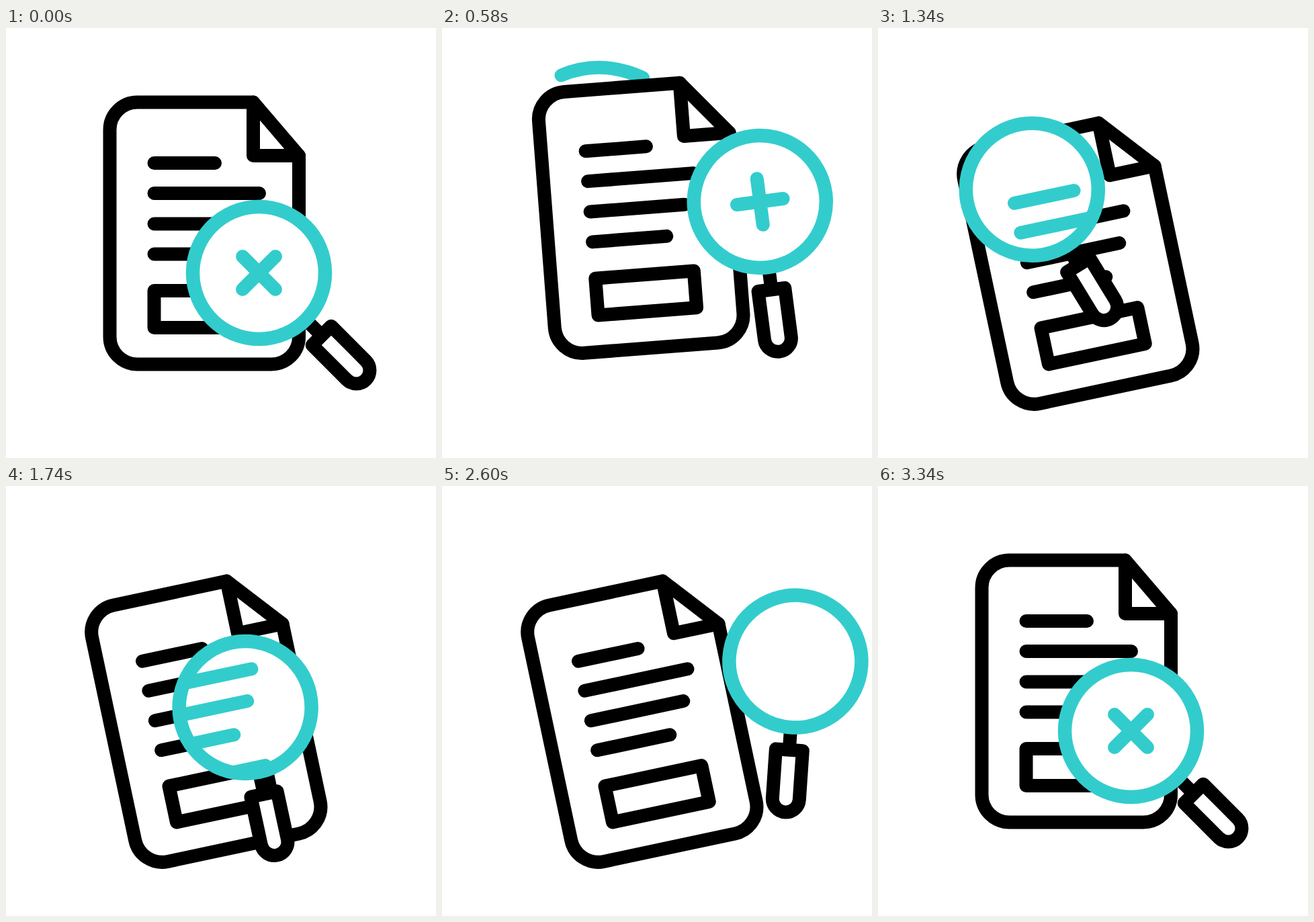
Write an HTML page that moves like this. It is 640x640 px and loops after 3480 ms.

```html
<!DOCTYPE html>
<html lang="en">
<head>
<meta charset="utf-8">
<title>Document search</title>
<style>
  html, body { margin: 0; width: 100%; height: 100%; overflow: hidden; background: #fff; }
  svg { display: block; width: 100vw; height: 100vh; }
</style>
</head>
<body>
<svg viewBox="0 0 640 640" fill="none" stroke="#000" stroke-width="20" stroke-linecap="round" stroke-linejoin="round">
  <clipPath id="lensClip"><circle id="lensHole" r="98"/></clipPath>
  <path id="swoosh" d="M299 74C220 38 137 66 75 167" stroke="#3cc" pathLength="1"/>
  <g id="page">
    <path d="M368 110.500H195.500a41 41 0 0 0-41 41V459.500a41 41 0 0 0 41 41H395a41 41 0 0 0 41-41V190Z" fill="#fff"/>
    <path d="M368 110.500V190H436"/>
    <g id="lines">
      <path d="M220.500 201H311M220.500 246H377M220.500 291.500H361M220.500 336.500H331"/>
      <path d="M220.500 391H367.500V446H220.500Z"/>
    </g>
  </g>
  <g id="glass">
    <path d="M0 98V132" stroke-linecap="butt"/>
    <path d="M-20 132H20V205a20 20 0 0 1-40 0Z" fill="#fff"/>
    <circle r="98.500" fill="#fff" stroke="none"/>
  </g>
  <g clip-path="url(#lensClip)"><use id="tinted" href="#lines" stroke="#3cc"/></g>
  <g id="rim" stroke="#3cc">
    <circle r="98.500" stroke-width="20.500"/>
    <path id="cross"/>
  </g>
</svg>
<script>
const LOOP = 3480;
const el = id => document.getElementById(id);
const set = (id, attrs) => {
  for (const key in attrs) el(id).setAttribute(key, attrs[key]);
};

// Cubic Bezier timing with control points (x1, 0) and (x2, 1)
function ease(x, x1 = 1 / 3, x2 = 2 / 3) {
  let lo = 0, hi = 1, s = x;
  for (let i = 0; i < 24; i++) {
    s = (lo + hi) / 2;
    const v = 3 * x1 * s * (1 - s) ** 2 + 3 * x2 * s * s * (1 - s) + s ** 3;
    if (v < x) lo = s; else hi = s;
  }
  return s * s * (3 - 2 * s);
}

const ramp = (t, from, to, x1, x2) =>
  t <= from ? 0 : t >= to ? 1 : ease((t - from) / (to - from), x1, x2);

// Each leg: start, end, target x, y, angle, optional bend point
const rest = [376.5, 364.5, -45];
const legs = [
  [260, 740, 510.5, 258, 5.5, [436, 241]],
  [900, 1440, 202, 238.5, -35],
  [1440, 1685, 371, 320, -15],
  [1685, 1930, 259, 392, 6.2],
  [1937, 2646, 529, 259, 3.9, [394, 348]],
  [2705, 3340, ...rest]
];

function glassPose(t) {
  let pose = rest;
  for (const [from, to, x, y, angle, bend] of legs) {
    if (t <= from) break;
    const p = ramp(t, from, to), end = [x, y, angle], start = pose;
    pose = start.map((a, i) => bend && i < 2
      ? a * (1 - p) ** 2 + 2 * bend[i] * p * (1 - p) + end[i] * p * p
      : a + (end[i] - a) * p);
  }
  return pose;
}

function pageTransform(t) {
  const hop = ramp(t, 260, 392);
  const tilt = ramp(t, 392, 965, 0.33, 0.4);
  const back = 1 - ramp(t, 2940, 3340);
  const dy = (-62 * hop + 104 * tilt) * back;
  return `translate(${2.5 * tilt * back} ${dy}) rotate(${-12 * tilt * back} 295 305)`;
}

function draw(t) {
  const page = pageTransform(t);
  set('page', { transform: page });
  set('tinted', { transform: page, visibility: t > 900 && t < 2750 ? 'visible' : 'hidden' });

  const [x, y, angle] = glassPose(t);
  const transform = `translate(${x} ${y}) rotate(${angle})`;
  set('glass', { transform });
  set('rim', { transform });
  set('lensHole', { cx: x, cy: y });

  const head = ramp(t, 280, 910), tail = ramp(t, 920, 1310);
  set('swoosh', {
    'stroke-dasharray': `${head - tail} 2`,
    'stroke-dashoffset': -tail,
    visibility: head - tail > 0.001 ? 'visible' : 'hidden'
  });

  const arm = 34.6 * (1 - ramp(t, 820, 980) + ramp(t, 3000, 3300));
  const opacity = 1 - ramp(t, 870, 980) + ramp(t, 3000, 3100);
  set('cross', { d: `M${-arm} 0H${arm}M0 ${-arm}V${arm}`, opacity });
}

const begin = performance.now();
function tick() {
  draw((performance.now() - begin) % LOOP);
  requestAnimationFrame(tick);
}
tick();
</script>
</body>
</html>
```
